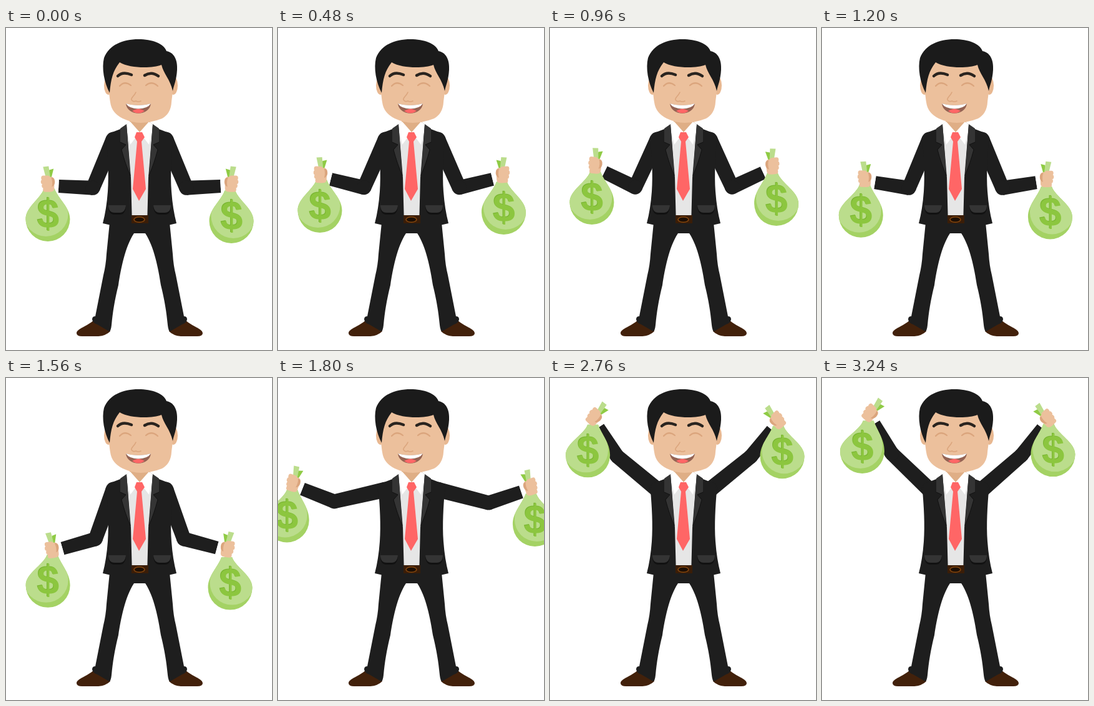
Recreate the animation shown at these times as an HTML page with a canvas. Size 426 by 516 pixels, loop 3840 ms.

```html
<!DOCTYPE html>
<html lang="en">
<head>
<meta charset="utf-8">
<title>Happy businessman</title>
<style>
html, body { margin: 0; width: 100%; height: 100%; overflow: hidden; background: #fff; }
canvas { display: block; }
</style>
</head>
<body>
<canvas id="stage" width="426" height="516"></canvas>
<script>
const ctx = document.getElementById('stage').getContext('2d');
const SUIT = '#1e1e1e', LAPEL = '#343434', SKIN = '#ecc09c', SHADE = '#dba57d';
const LIGHT = '#bbdd8c', GREEN = '#a4d264', SIGN = '#8cc63f';
const STEP = 120, LOOP = 3840, AXIS = 214;

// Pose rows: step, upper arm angle, forearm angle, hand tilt, bag offset x, y
const arms = [
  { poses: [[0, -67, 3, 0, 1.7, 54], [4, -66, 14, 3, 1, 54.7], [8, -65, 26, 8, -3, 56.8],
            [13, -70, -16, -6, -5, 54], [17, 44, 59, 44, -9, 60.3]],
    wave: [-15, -7, 0, 9, 1] },
  { poses: [[0, -67, 3, 0, 1.7, 57], [4, -66, 14, 3, .5, 57.7], [8, -65, 25, 6, -4, 57.7],
            [13, -70, -15, -6, -2.8, 59], [17, 41, 52, 44, -5, 57]],
    wave: [-7, -3.5, 0, 3, 0], mirrored: true }
];

function shape(d, fill) {
  ctx.fillStyle = fill;
  ctx.fill(new Path2D(d));
}

function line(d, color, width) {
  ctx.strokeStyle = color;
  ctx.lineWidth = width;
  ctx.lineCap = 'round';
  ctx.stroke(new Path2D(d));
}

function disc(x, y, rx, ry, fill) {
  ctx.fillStyle = fill;
  ctx.beginPath();
  ctx.ellipse(x, y, rx, ry, 0, 0, 7);
  ctx.fill();
}

function flip() {
  ctx.translate(2 * AXIS, 0);
  ctx.scale(-1, 1);
}

function bothSides(draw) {
  for (const mirrored of [false, true]) {
    ctx.save();
    if (mirrored) flip();
    draw();
    ctx.restore();
  }
}

function placed([x, y], angle, draw) {
  ctx.save();
  ctx.translate(x, y);
  ctx.rotate(angle);
  draw();
  ctx.restore();
}

function poseAt({ poses, wave }, step) {
  let i = 0;
  while (i < poses.length - 2 && step > poses[i + 1][0]) i++;
  const a = poses[i], b = poses[i + 1];
  const mix = Math.min(1, (step - a[0]) / (b[0] - a[0]));
  const k = Math.min(5, Math.max(0, step - 22));
  const swing = Math.pow(Math.abs(Math.sin(Math.PI * k / 5)) / .951, 2.6);
  return wave.map((w, j) => a[j + 1] + (b[j + 1] - a[j + 1]) * mix + w * swing);
}

function along([x, y], angle, length) {
  return [x - Math.cos(angle) * length, y - Math.sin(angle) * length];
}

function drawLimb(from, angle, length, width, endWidth) {
  placed(from, angle, () =>
    shape(`M0 ${-width}L${-length} ${-endWidth}V${endWidth}L0 ${width}Z`, SUIT));
  disc(...from, width, width, SUIT);
}

function drawKnot() {
  shape('M4-25 11-27 7-11 2-11Z', '#8fcb45');
  shape('M-6-30 3-31 6-11-1-11Z', LIGHT);
}

function drawHand() {
  ctx.fillStyle = SKIN;
  ctx.beginPath();
  ctx.roundRect(-6, -14, 18, 24, 5);
  for (let i = 0; i < 4; i++) ctx.roundRect(-9 + [0, -.5, 1, 3][i], -16 + i * 6.3, 14, 7.5, 3.5);
  ctx.fill();
  shape('M7-13Q13-13 13-6Q13 0 8 2Q10-6 7-13Z', SHADE);
}

function drawBag(x, y, neck, mirrored) {
  ctx.save();
  ctx.translate(x, y);
  const bag = new Path2D(`M${neck - 8}-49C${neck - 14}-32-35.5-20-35.5 0A35.5 35.5 0 0 0 35.5 0` +
    `C35.5-20 ${neck + 15}-32 ${neck + 9}-49Z`);
  ctx.fillStyle = GREEN;
  ctx.fill(bag);
  ctx.clip(bag);
  ctx.translate(-3, -8);
  ctx.fillStyle = LIGHT;
  ctx.fill(bag);
  ctx.translate(3, 8);
  if (mirrored) ctx.scale(-1, 1);
  ctx.font = 'bold 64px "Liberation Sans", Arial, sans-serif';
  ctx.textAlign = 'center';
  ctx.fillStyle = '#78b531';
  ctx.fillText('$', -.5, 13);
  ctx.fillStyle = SIGN;
  ctx.fillText('$', .5, 14);
  ctx.restore();
}

function drawArm(arm, step) {
  const [up, down, turn, dx, dy] = poseAt(arm, step);
  const [upper, fore, tilt] = [up, down, turn].map(a => a * Math.PI / 180);
  const shoulder = [172, 179], elbow = along(shoulder, upper, 84);
  const hand = along(elbow, fore, 74);
  ctx.save();
  if (arm.mirrored) flip();
  drawLimb(shoulder, upper, 84, 12.5, 11.5);
  drawLimb(elbow, fore, 55, 11.5, 10.5);
  placed(hand, fore, () => shape('M13-10H19V10H13Z', '#fff'));
  placed(hand, tilt, drawKnot);
  drawBag(hand[0] + dx, hand[1] + dy, 3 - dx * .7, arm.mirrored);
  placed(hand, tilt, drawHand);
  ctx.restore();
}

function drawBody() {
  bothSides(() => {
    shape('M141 468C130 478 113 482 113 489Q113 494 122 494H148Q160 493 167 486L160 470Z', '#42210b');
    shape('M166 312L161 362Q160 380 156 396L143 462Q138 462 138 467Q139 473 146 475L165 486Q168 486 169 476' +
      'C171 455 174 436 180 412C184 385 191 350 205 329H215V312Z', SUIT);
  });
  shape('M192 155 199 150H230L236 155 230 302H199Z', '#e6e6e6');
  shape('M198 149H231V153L214 168 198 153Z', '#dfae86');
  bothSides(() => shape('M199 150 192 156 199 187 214 167Z', '#fff'));
  shape('M209 167H218L222 175 217 182 224 258 213 277 203 258 210 182 206 175Z', '#ff6666');
  bothSides(() => {
    shape('M193 155 183 162L170 167Q163 170 161 181C163 205 165 235 163 262Q161 290 155 313L168 316H202' +
      'L200 240Z', SUIT);
    shape('M193 154 183 161V183L192 187 185 195Q191 218 199 236Z', LAPEL);
    line('M183 183 192 187 185 195Q191 218 199 236', '#111', 1);
    shape('M164 286Q164 299 174 299H182Q191 299 192 286Z', '#111');
    shape('M164 284H192Q191 296 182 296H174Q164 296 164 284Z', LAPEL);
  });
  shape('M201 300H228V313H201Z', '#3a1d08');
  shape('M201 313H228V320H201Z', SUIT);
  disc(213.5, 307, 9.3, 5.1, '#85470f');
  disc(213.5, 307, 7.7, 3.5, '#1d0f05');
}

function drawHead() {
  disc(164, 92, 7, 15, '#e8b891');
  disc(268, 92, 7, 15, '#e8b891');
  shape('M163 45C163 90 165 104 167 119Q169 136 187 145Q202 152 216 152Q235 151 250 145Q264 137 265 119' +
    'C267 104 269 90 269 45Z', SKIN);
  shape('M166 104C157 87 153 64 157 48C165 27 187 18 212 18C234 18 253 25 257 37C269 39 275 51 274 67' +
    'C273 84 269 91 267 101C263 82 252 73 249 59C234 65 199 65 182 55C171 69 168 82 166 104Z', '#1b1b1b');
  line('M179 77Q187 69 201 75M222 76Q233 69 244 77', '#2a241f', 4.5);
  line('M182 93Q190 84 200 92M224 92Q233 84 243 93', SHADE, 2.2);
  line('M208 103C205 110 200 111 201 115Q203 119 208 117Q212 119 216 117', SHADE, 1.6);
  shape('M192 121Q212 127 232 121C230 142 194 142 192 121Z', '#946353');
  shape('M192 121Q212 127 232 121Q227 129 212 129.5Q197 129 192 121Z', '#fff');
  shape('M202 133Q212 126 222 133Q212 140 202 133Z', '#ff6666');
}

function frame(now) {
  const step = Math.floor(now % LOOP / STEP);
  ctx.fillStyle = '#fff';
  ctx.fillRect(0, 0, 426, 516);
  arms.forEach(arm => drawArm(arm, step));
  drawBody();
  drawHead();
  requestAnimationFrame(frame);
}

requestAnimationFrame(frame);
</script>
</body>
</html>
```
